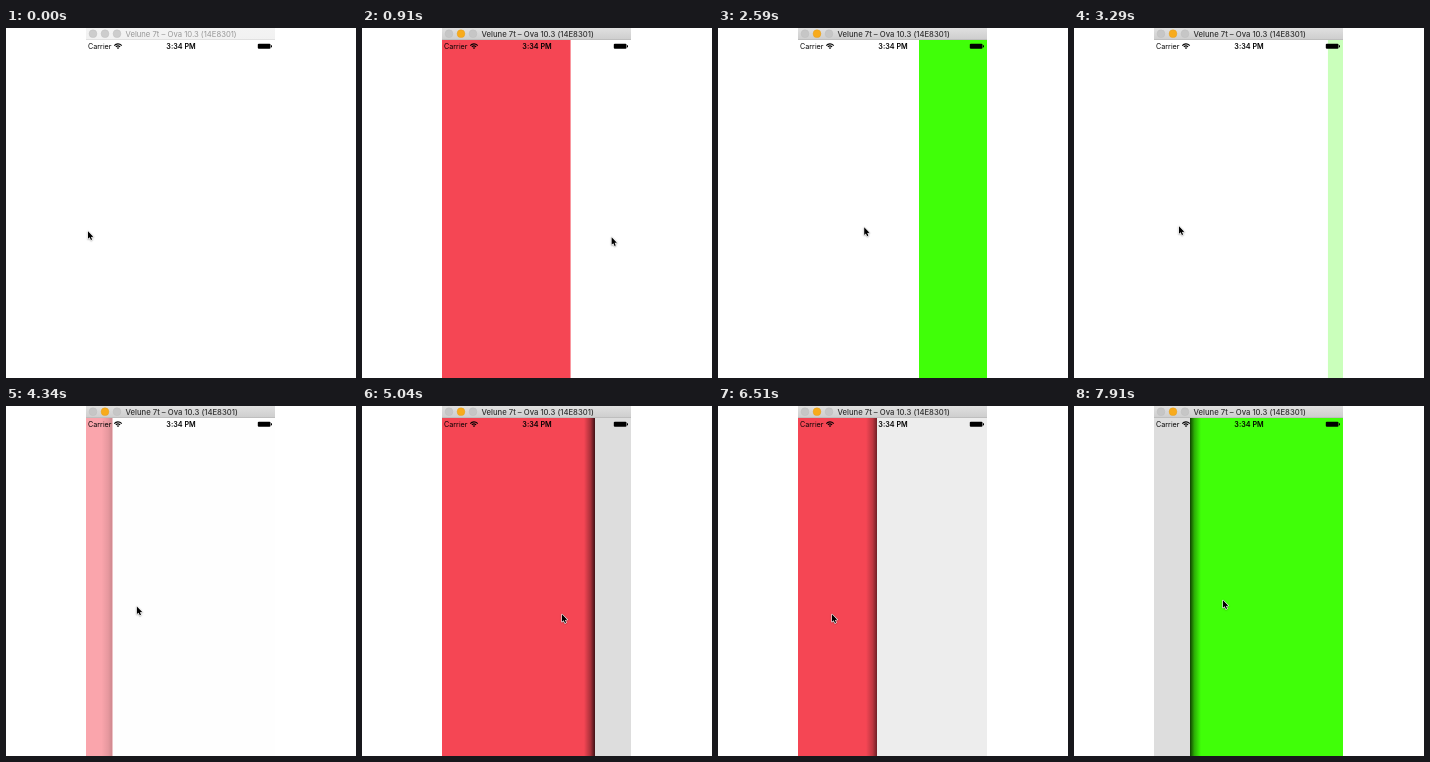
An HTML page with a canvas for the animation above (8 s loop, 350 by 350 pixels).

```html
<!DOCTYPE html>
<html lang="en">
<head>
<meta charset="utf-8">
<title>Side menu demo</title>
<style>
html, body { margin: 0; width: 100%; height: 100%; overflow: hidden; background: #fff; }
canvas { display: block; width: 350px; height: 350px; }
</style>
</head>
<body>
<canvas id="stage"></canvas>
<script>
const SIZE = 350, LOOP = 8000, STEP = 70, LAST = 7910;
const LEFT = 80, RIGHT = 269, BAR = 12, BOTTOM = 350;
const OPEN = 153, SWIPE = 840, SNAP = 204;
const FOCUS_AT = 280, LAYERED_AT = 4000;
const FONT = 'Inter, Roboto, sans-serif';

const canvas = document.getElementById('stage');
const ctx = canvas.getContext('2d');
const ratio = window.devicePixelRatio || 1;
canvas.width = canvas.height = SIZE * ratio;
ctx.scale(ratio, ratio);

// Each move leads from the state before it; page > 0 shows the left menu.
const rest = { x: 82, y: 203, page: 0 };
const moves = [
  { at: 140, dur: SWIPE, x: 253, y: 209, page: OPEN },
  { at: 1330, dur: SNAP, page: 0 },
  { at: 1534, dur: 356, x: 264, y: 202 },
  { at: 2030, dur: SWIPE, x: 105, y: 198, page: -OPEN },
  { at: 3150, dur: SNAP, page: 0 },
  { at: 3354, dur: 566, x: 82 },
  { at: 3990, dur: SWIPE, x: 212, y: 204, page: OPEN },
  { at: 4830, dur: 210, x: 200, y: 208 },
  { at: 5110, dur: 630, x: 127, page: 78 },
  { at: 5740, dur: 770, x: 114, page: 79, sway: 28 },
  { at: 6510, dur: 210, x: 87, page: 0 },
  { at: 6790, dur: 420, x: 264, y: 201 },
  { at: 7350, dur: 560, x: 149, y: 194, page: -OPEN }
];

const clamp = (v, lo, hi) => Math.min(hi, Math.max(lo, v));
const lerp = (a, b, p) => a + (b - a) * p;
const smooth = p => p * p * (3 - 2 * p);
const easeIn = p => p * p;
const easeOut = p => 1 - (1 - p) ** 2;

function stateAt(t) {
  let state = rest;
  for (const move of moves) {
    if (t < move.at) break;
    const p = clamp((t - move.at) / move.dur, 0, 1);
    const goal = { ...state, ...move };
    const opening = Math.abs(goal.page) > Math.abs(state.page);
    const sway = (move.sway || 0) * Math.sin(p * Math.PI * 2);
    state = {
      x: lerp(state.x, goal.x, smooth(p)) - sway,
      y: lerp(state.y, goal.y, smooth(p)),
      page: lerp(state.page, goal.page, (opening ? easeIn : easeOut)(p)) - sway
    };
  }
  return state;
}

function rect(x, y, w, h, fill) {
  ctx.fillStyle = fill;
  ctx.fillRect(x, y, w, h);
}

function text(str, x, y, size, weight, fill, align = 'left') {
  ctx.font = `${weight} ${size}px ${FONT}`;
  ctx.textAlign = align;
  ctx.fillStyle = fill;
  ctx.fillText(str, x, y);
}

function drawTitleBar(active) {
  const g = ctx.createLinearGradient(0, 0, 0, BAR);
  g.addColorStop(0, active ? '#e0e0e0' : '#f3f3f3');
  g.addColorStop(1, active ? '#cdcdcd' : '#f1f1f1');
  rect(LEFT, 0, RIGHT - LEFT, BAR, g);
  rect(LEFT, BAR - 0.6, RIGHT - LEFT, 0.6, active ? '#b4b4b4' : '#d6d6d6');
  for (let i = 0; i < 3; i++) {
    const lit = active && i === 1;
    ctx.beginPath();
    ctx.arc(87 + i * 12, 5.7, 3.9, 0, Math.PI * 2);
    ctx.fillStyle = lit ? '#f8ab1c' : active ? '#c6c6c6' : '#cdcdcd';
    ctx.fill();
    ctx.lineWidth = 0.4;
    ctx.strokeStyle = lit ? '#e09c20' : '#bcbcbc';
    ctx.stroke();
  }
  text('Velune 7t – Ova 10.3 (14E8301)', 119.5, 8.5, 7.7, active ? 500 : 400,
    active ? '#303030' : '#969696');
}

function drawStatusBar() {
  text('Carrier', 82, 21, 7.2, 400, '#000');
  text('3:34 PM', 175, 21, 7.2, 600, '#000', 'center');

  ctx.strokeStyle = ctx.fillStyle = '#000';
  ctx.lineWidth = 1.1;
  const from = -Math.PI * 0.76, to = -Math.PI * 0.24;
  for (const r of [3, 5.1]) {
    ctx.beginPath();
    ctx.arc(112, 21, r, from, to);
    ctx.stroke();
  }
  ctx.beginPath();
  ctx.moveTo(112, 21);
  ctx.arc(112, 21, 1.6, from, to);
  ctx.fill();

  ctx.beginPath();
  ctx.roundRect(251.8, 15.8, 12.7, 5, 1);
  ctx.fill();
  rect(265, 17.3, 1, 2, '#000');
}

function drawShadow(edge, dir, alpha) {
  const reach = 11;
  const g = ctx.createLinearGradient(edge, 0, edge + dir * reach, 0);
  g.addColorStop(0, `rgba(0,0,0,${alpha})`);
  g.addColorStop(0.4, `rgba(0,0,0,${alpha * 0.42})`);
  g.addColorStop(1, 'rgba(0,0,0,0)');
  rect(dir > 0 ? edge : edge - reach, BAR, reach, BOTTOM - BAR, g);
}

// A layered page casts a shadow on the menu and darkens as it slides away.
function drawPhone(offset, layered) {
  const w = RIGHT - LEFT, h = BOTTOM - BAR, shift = Math.abs(offset);
  const left = offset > 0;
  ctx.save();
  ctx.beginPath();
  ctx.rect(LEFT, BAR, w, h);
  ctx.clip();
  if (shift > 0) {
    ctx.globalAlpha = Math.min(1, shift / 55);
    rect(LEFT, BAR, w, h, left ? '#f54654' : '#40ff08');
    ctx.globalAlpha = 1;
    if (layered) {
      drawShadow((left ? LEFT : RIGHT) + offset, left ? -1 : 1, Math.min(0.75, shift / 145));
    }
  }
  const tone = 255 - (layered ? Math.round(clamp((shift - 22) * 0.32, 0, 34)) : 0);
  rect(LEFT + offset, BAR, w, h, `rgb(${tone},${tone},${tone})`);
  ctx.restore();
}

function drawPointer(x, y) {
  ctx.save();
  ctx.translate(x, y + 0.3);
  ctx.scale(0.88, 0.88);
  ctx.lineJoin = 'round';
  ctx.lineWidth = 1.3;
  ctx.strokeStyle = '#fff';
  ctx.fillStyle = '#000';
  ctx.shadowColor = 'rgba(0,0,0,0.4)';
  ctx.shadowBlur = 1.5 * ratio;
  ctx.shadowOffsetY = 0.5 * ratio;
  const arrow = new Path2D('M0 0V8.6L1.9 6.9 3.3 10 4.7 9.4 3.4 6.4 6 6.2Z');
  ctx.stroke(arrow);
  ctx.shadowColor = 'transparent';
  ctx.fill(arrow);
  ctx.restore();
}

function draw(now) {
  const t = Math.min(LAST, Math.floor((now % LOOP) / STEP) * STEP);
  const { x, y, page } = stateAt(t);
  rect(0, 0, SIZE, SIZE, '#fff');
  drawPhone(page, t > LAYERED_AT);
  drawTitleBar(t >= FOCUS_AT);
  drawStatusBar();
  drawPointer(x, y);
}

const start = performance.now();
function tick() {
  draw(performance.now() - start);
  requestAnimationFrame(tick);
}
tick();
</script>
</body>
</html>
```
